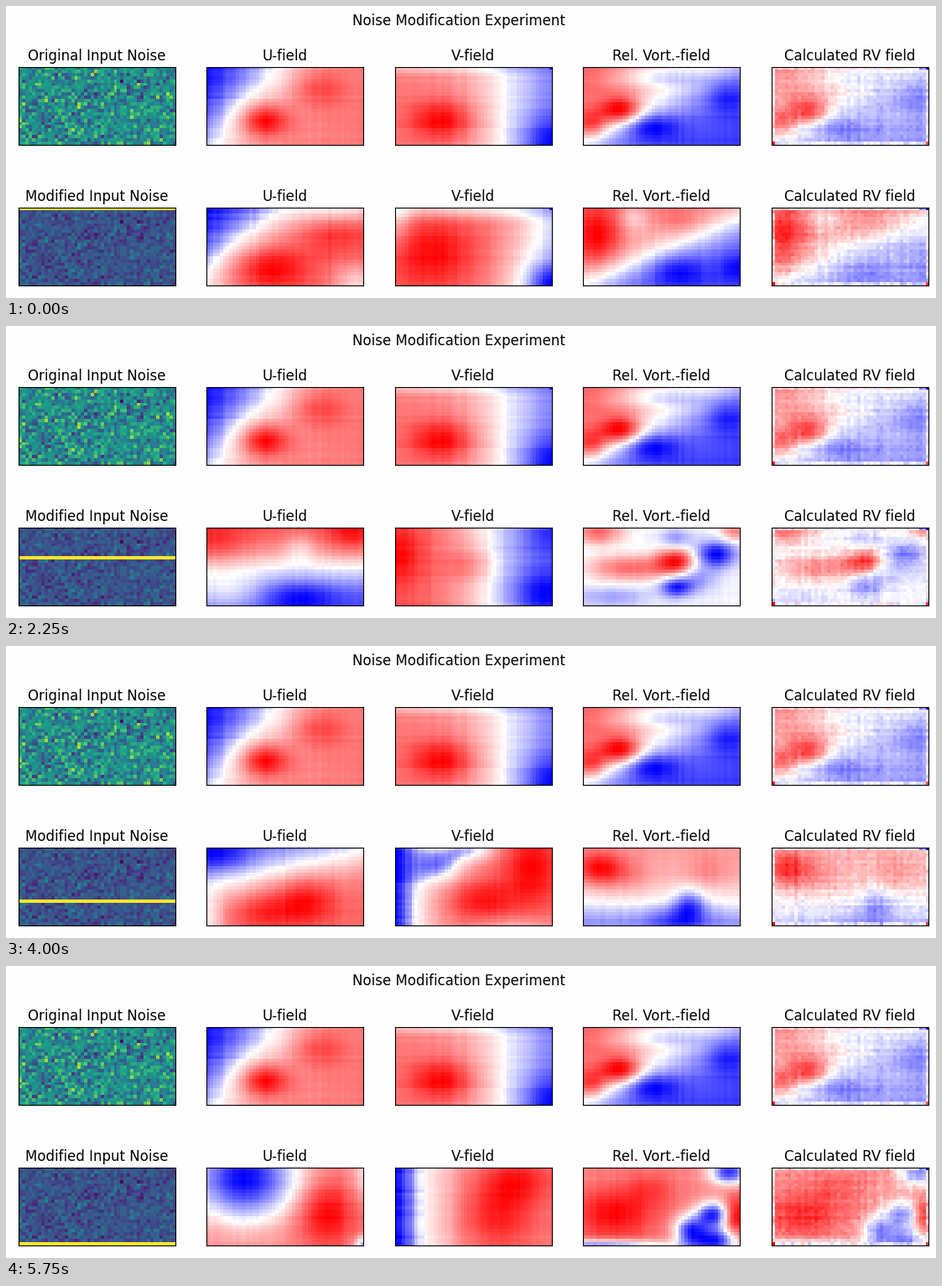
A matplotlib script for the animation above (6 s loop, 1109 by 349 pixels).

```python
import numpy as np
import matplotlib.pyplot as plt
from matplotlib.animation import FuncAnimation

W, H, DPI = 1109, 349, 100
ROWS, COLS = 24, 48
PANEL_W, PANEL_H, STEP = 187.07, 93.53, 224.483
LEFT, TOP, BOTTOM = 14.7, 72.9, 240.9
TITLES = ["U-field", "V-field", "Rel. Vort.-field", "Calculated RV field"]

plt.rcParams["font.family"] = "DejaVu Sans"
rng = np.random.default_rng(11)
yy, xx = np.mgrid[0:ROWS, 0:COLS].astype(float)


def front(x, y, deg, width):
    """Soft step through (x, y), positive towards the angle (y points down)."""
    a = np.radians(deg)
    return np.tanh(((xx - x) * np.cos(a) + (yy - y) * np.sin(a)) / width)


def blob(amp, x, y, rx, ry):
    return amp * np.exp(-((xx - x) / rx) ** 2 - ((yy - y) / ry) ** 2)


def normalise(f):
    """Zero stays white, both extremes reach full colour."""
    return np.where(f > 0, f / max(f.max(), 1e-6), f / max(-f.min(), 1e-6))


def streaks(f, size):
    return f + rng.normal(0, size, (ROWS, 1)) + rng.normal(0, size, (1, COLS))


def calculated(rv):
    """Paler, rougher copy with the broken borders of finite differences."""
    f = np.where(rv > 0, .75 * rv, .5 * rv)
    f = streaks(f, .03) + rng.normal(0, .03, f.shape)
    for edge in (np.s_[0, :], np.s_[-1, :], np.s_[:, 0], np.s_[:, -1]):
        f[edge] = .35 * f[edge] + rng.normal(0, .1, f[edge].shape)
    f[0, -3:] = -.5, -.3, -1
    f[-1, [0, -1]] = .9, .7
    return f


def fields(u, v, rv):
    u, v, rv = (normalise(streaks(f, .012)) for f in (u, v, rv))
    if v[0, -1] < .1:
        v[0, -1] = -.9
    return np.array([u, v, rv, calculated(rv)])


base = fields(
    .45 * front(12, 11, 39, 14) + blob(.6, 17, 16, 7, 5) + blob(.25, 34, 6, 8, 6),
    .5 * front(33, 12, 180, 16) + blob(.5, 14, 16, 10, 6) + blob(-.4, 47, 23, 10, 8)
    + blob(-.25, 10, 0, 30, 2),
    .5 * front(20, 11, -118, 10) + blob(.6, 11, 13, 6, 4) + blob(.4, 2, 17, 5, 4)
    + blob(-.35, 22, 2, 14, 4) + blob(-.35, 20, 18, 8, 4) + blob(-.2, 43, 9, 6, 5))

# line position -> fields produced by the modified noise
states = {
    0: fields(
        .5 * front(10, 11, 45, 12) + blob(.45, 18, 18, 12, 7) + blob(.2, 38, 9, 11, 6)
        + blob(-.35, 42, 0, 16, 4) + blob(-.35, 46, 23, 8, 6),
        .5 * front(42, 12, 195, 12) + blob(.4, 11, 14, 14, 11) + blob(-.6, 47, 23, 7, 6)
        + blob(-.4, 24, 0, 40, 3) + blob(-.3, 0, 3, 5, 9),
        .6 * front(23, 13, -112, 8) + blob(.5, 4, 9, 7, 9) + blob(.15, 30, 4, 6, 4)
        + blob(-.35, 15, 3, 5, 5) + blob(-.3, 28, 19, 8, 5) + blob(-.2, 46, 18, 5, 4)),
    5: fields(
        .6 * front(14, 11, 45, 10) + blob(.3, 32, 14, 10, 7) + blob(.25, 30, 22, 16, 6)
        + blob(-.65, 38, 0, 18, 3.5),
        .25 + blob(.6, 10, 19, 11, 8) + blob(.4, 22, 12, 11, 7) + blob(.2, 42, 13, 10, 7)
        + blob(-.55, 40, 0, 20, 4) + blob(-.45, 2, 4, 9, 7) + blob(-.35, 46, 23, 6, 5),
        -.45 + blob(1.1, 8, 13, 10, 5) + blob(.5, 17, 9, 6, 5) + blob(.9, 34, 4, 10, 4)
        + blob(-.45, 27, 14, 6, 6) + blob(.4, 20, 4, 6, 4)),
    9: fields(
        .7 * front(24, 12, -90, 9) + blob(.3, 44, 1, 7, 6) + blob(.25, 2, 5, 9, 7)
        + blob(-.3, 28, 21, 10, 5) + blob(-.25, 28, 6, 5, 5) + blob(.4, 5, 20, 12, 6),
        .6 * front(28, 12, 180, 16) + blob(.3, 0, 8, 8, 9) + blob(-.3, 44, 20, 9, 7)
        + blob(-.15, 46, 2, 7, 5) + blob(.2, 22, 11, 8, 5),
        -.05 + blob(.9, 28, 10, 6, 4) + blob(.6, 14, 12, 13, 4) + blob(.6, 4, 1, 8, 4)
        + blob(.5, 46, 1, 5, 3) + blob(-1, 40, 8, 6, 4) + blob(-.9, 28, 18, 5, 3)
        + blob(-.4, 34, 15, 6, 4) + blob(-.35, 8, 21, 11, 3) + blob(-.4, 28, 3, 5, 3)),
    13: fields(
        .7 * front(38, 16, 60, 10) + blob(.7, 11, 20, 11, 7) + blob(-.35, 25, 6, 11, 6)
        + blob(-.2, 3, 6, 9, 6) + blob(-.2, 25, 19, 5, 5),
        .55 * front(24, 9, 82, 9) + blob(.6, 38, 17, 10, 7) + blob(-.6, 14, 19, 7, 6)
        + blob(-.2, 10, 3, 11, 5) + blob(.3, 42, 2, 11, 4),
        .1 + blob(.7, 29, 4, 6, 6) + blob(.9, 38, 16, 8, 5) + blob(.7, 27, 20, 10, 4)
        + blob(.5, 3, 15, 5, 3) + blob(-1, 5, 4, 13, 5) + blob(-.9, 43, 5, 6, 4)
        + blob(-.8, 12, 17, 5, 4) + blob(-.6, 5, 21, 8, 3)),
    16: fields(
        .55 * front(20, 7, 77, 9) + blob(.4, 30, 16, 9, 7) + blob(.3, 17, 19, 10, 6)
        + blob(-.3, 3, 2, 9, 5) + blob(-.35, 0, 22, 5, 7),
        .55 * front(6, 12, 0, 10) + blob(.35, 26, 16, 10, 6) + blob(.4, 41, 6, 8, 11)
        + blob(-.5, 14, 5, 8, 6) + blob(-.5, 23, 0, 8, 4) + blob(-.35, 36, 25, 14, 4),
        .35 * front(24, 16, -90, 7) + blob(.6, 4, 6, 7, 5) + blob(.2, 12, 8, 8, 6)
        + blob(.15, 38, 7, 7, 5) + blob(-.45, 32, 17, 5, 5) + blob(-.25, 28, 22, 9, 4)),
    20: fields(
        .45 * front(12, 10, 51, 9) + blob(.6, 16, 17, 9, 7) + blob(-.25, 33, 13, 6, 6),
        .5 * front(37, 12, 185, 14) + blob(.5, 15, 16, 11, 8) + blob(.3, 21, 4, 7, 6)
        + blob(-.5, 0, 4, 7, 9) + blob(-.4, 47, 23, 7, 7),
        -.4 + blob(1.2, 6, 14, 10, 5) + blob(.8, 15, 8, 6, 6) + blob(.2, 4, 2, 9, 4)
        + blob(-.2, 38, 11, 7, 5) + blob(-.25, 17, 21, 9, 5) + blob(.25, 46, 1, 8, 5)),
    23: fields(
        .45 + blob(-1.5, 11, 3, 15, 12) + blob(.5, 36, 14, 9, 10) + blob(-1, 48, 24, 3, 3)
        + blob(-.35, 48, 2, 4, 9),
        .55 * front(8, 11, 0, 14) + blob(.4, 30, 14, 11, 11) + blob(.35, 37, 4, 10, 7),
        .4 + blob(.4, 9, 14, 13, 8) + blob(.2, 20, 6, 7, 5) + blob(-.9, 44, 1, 6, 4)
        + blob(-.9, 39, 14, 5, 4) + blob(-.9, 40, 22, 7, 4) + blob(-.8, 32, 19, 5, 5)
        + blob(.5, 46, 15, 3, 6) + blob(-.9, 6, 24, 20, 2)),
}
stops = list(states)


def blended(row):
    i = min(np.searchsorted(stops, row, side="right") - 1, len(stops) - 2)
    a, b = stops[i:i + 2]
    t = (row - a) / (b - a)
    return [normalise(f) for f in (1 - t) * states[a] + t * states[b]]


noise = rng.normal(0, .9, (ROWS, COLS))


def modified(row):
    out = noise.copy()
    out[row] = 9.5
    return out


fig = plt.figure(figsize=(W / DPI, H / DPI), dpi=DPI, facecolor="#fefefe")
fig.text(539.7 / W, 1 - 23 / H, "Noise Modification Experiment", fontsize=12, ha="center")


def panel(col, top, title, data, cmap, lo, hi):
    ax = fig.add_axes([(LEFT + col * STEP) / W, 1 - (top + PANEL_H) / H,
                       PANEL_W / W, PANEL_H / H])
    ax.set(xticks=[], yticks=[])
    ax.set_title(title, fontsize=12, y=1.0, pad=6)
    return ax.imshow(data, cmap=cmap, vmin=lo, vmax=hi, aspect="auto",
                     interpolation="nearest")


panel(0, TOP, "Original Input Noise", noise, "viridis", -3.2, 3.4)
noise_img = panel(0, BOTTOM, "Modified Input Noise", modified(0), "viridis", -3.2, 9.5)
images = []
for col, (title, still, moving) in enumerate(zip(TITLES, base, blended(0)), 1):
    panel(col, TOP, title, still, "bwr", -1, 1)
    images.append(panel(col, BOTTOM, title, moving, "bwr", -1, 1))


def update(row):
    noise_img.set_data(modified(row))
    for img, f in zip(images, blended(row)):
        img.set_data(f)
    return [noise_img, *images]


anim = FuncAnimation(fig, update, frames=ROWS, interval=250, repeat=True, repeat_delay=0)
plt.show()
```
